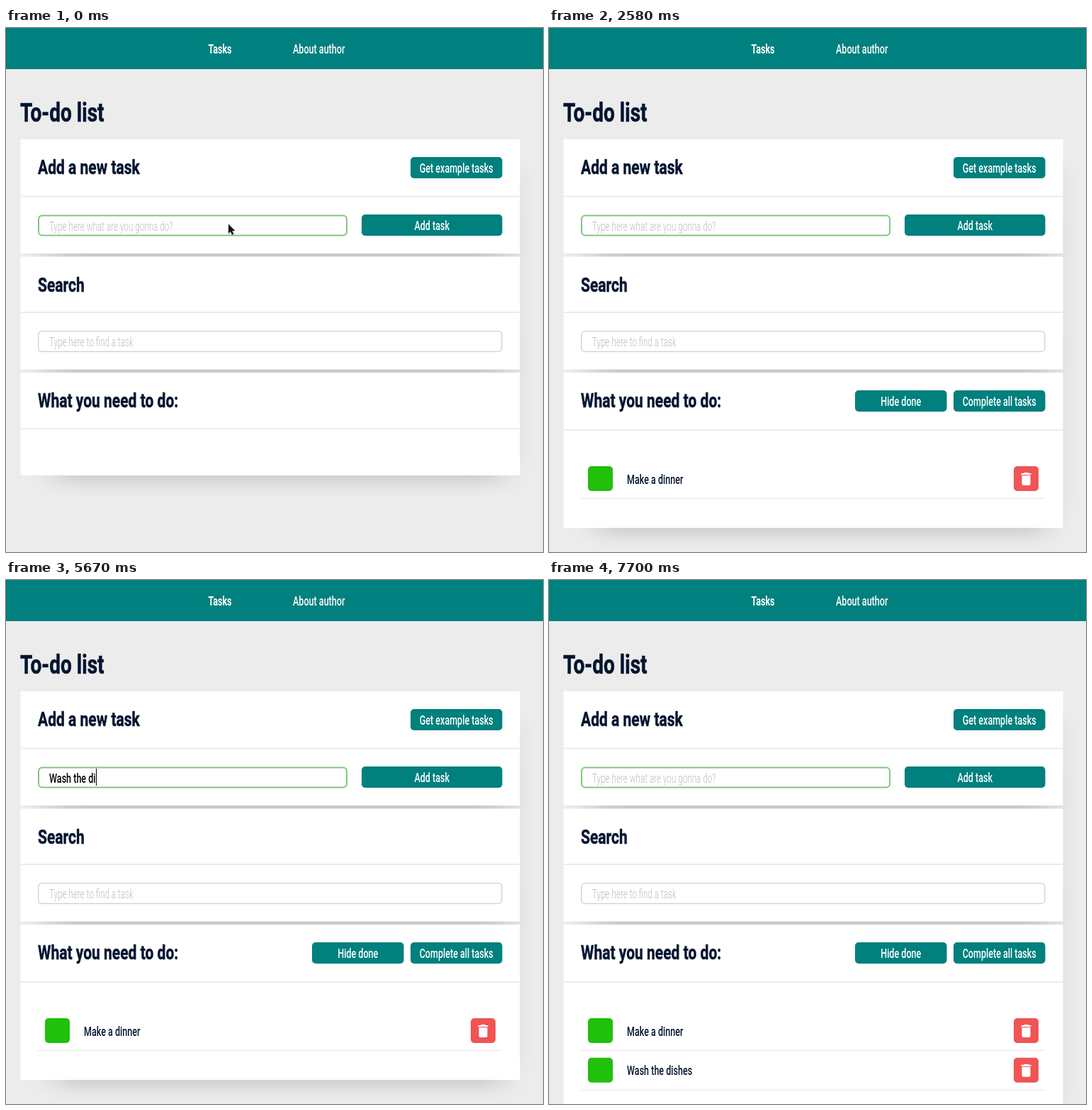
An HTML page that plays this animation: 758 by 739 pixels, repeating every 8000 ms.

```html
<!DOCTYPE html>
<html lang="en">
<head>
<meta charset="utf-8">
<title>To-do list</title>
<style>
  html, body { margin: 0; width: 100%; height: 100%; overflow: hidden; background: #ececec; }
  svg { display: block; }
  text { font-family: Roboto, "Open Sans", "Liberation Sans", sans-serif; white-space: pre; }
</style>
</head>
<body>
<svg id="stage" width="758" height="739" viewBox="0 0 758 739">
  <defs>
    <filter id="under" x="-20%" y="-100%" width="140%" height="300%"><feGaussianBlur stdDeviation="22 12"/></filter>
    <filter id="around" x="-20%" y="-20%" width="140%" height="140%"><feGaussianBlur stdDeviation="12"/></filter>
    <filter id="soft" x="-50%" y="-50%" width="200%" height="200%"><feGaussianBlur stdDeviation="1"/></filter>
  </defs>
</svg>
<script>
const LOOP = 8000;
const TEAL = '#00807e', NAVY = '#041530', LINE = '#ececec';
const ROW = 55.7;

// One condensed cut per weight: size, weight, horizontal ratio.
const FACE = {
  title: { size: 36.4, weight: 700, ratio: 0.77, stroke: 0.6 },
  heading: { size: 27.3, weight: 700, ratio: 0.77, stroke: 0.5 },
  strong: { size: 18.2, weight: 700, ratio: 0.69 },
  body: { size: 18.2, weight: 500, ratio: 0.69 },
  light: { size: 18.2, weight: 300, ratio: 0.643 }
};

const ENTRIES = [
  { text: 'Make a dinner', added: 2580,
    keys: [240, 650, 980, 1060, 1130, 1300, 1380, 1530, 1600, 1840, 1920, 2000, 2080] },
  { text: 'Wash the dishes', added: 7380,
    keys: [3570, 3730, 4300, 4540, 4700, 5020, 5190, 5270, 5350, 5500, 5670, 5830, 5990, 6070, 6230] }
];
const CARET_OFF = [[0, 240], [2580, 3080], [4230, 4300], [6730, 7220], [7700, LOOP]];
const POINTER_HIDES = 1450;

const stage = document.getElementById('stage');

function add(parent, tag, attrs) {
  const node = document.createElementNS('http://www.w3.org/2000/svg', tag);
  for (const name in attrs) node.setAttribute(name, attrs[name]);
  return parent.appendChild(node);
}

function rect(parent, x, y, width, height, fill, more = {}) {
  return add(parent, 'rect', { x, y, width, height, fill, ...more });
}

function label(parent, x, y, content, face, fill, anchor = 'start') {
  const node = add(parent, 'text', {
    transform: `translate(${x} ${y}) scale(${face.ratio} 1)`,
    'font-size': face.size, 'font-weight': face.weight, 'text-anchor': anchor, fill
  });
  if (face.stroke) {
    node.setAttribute('stroke', fill);
    node.setAttribute('stroke-width', face.stroke);
  }
  node.textContent = content;
  return node;
}

function button(parent, x, y, width, caption) {
  rect(parent, x, y, width, 30, TEAL, { rx: 5 });
  label(parent, x + width / 2, y + 22, caption, FACE.body, '#fff', 'middle');
}

function field(x, y, width, color, border) {
  rect(stage, x + border / 2, y + border / 2, width - border, 30 - border, '#fff',
    { rx: 5, stroke: color, 'stroke-width': border });
}

function section(top, bottom, divider, heading) {
  const shadow = rect(stage, 70, bottom - 50, 630, 59, '#000', { opacity: 0.15, filter: 'url(#under)' });
  const panel = rect(stage, 20.5, top, 705, bottom - top, '#fff');
  const rule = rect(stage, 20.5, divider, 705, 2, LINE);
  label(stage, 45, top + 49.3, heading, FACE.heading, NAVY);
  return { shadow, panel, rule, top };
}

function taskRow(parent, y, caption) {
  const row = add(parent, 'g', { transform: `translate(0 ${y})` });
  rect(row, 55, 0, 35, 35, '#20c00b', { rx: 5 });
  label(row, 110, 24.5, caption, FACE.body, NAVY);
  rect(row, 656, 0, 35, 35, '#f05454', { rx: 5 });
  rect(row, 666.5, 10, 14, 2, '#fff');
  rect(row, 670, 9, 7, 2, '#fff', { rx: 0.7 });
  add(row, 'path', { d: 'M667.5 13h12v12a2 2 0 0 1-2 2h-8a2 2 0 0 1-2-2z', fill: '#fff' });
  rect(row, 45, 45, 655, 1, '#e6e6e6');
  return row;
}

rect(stage, 0, 0, 758, 739, '#ececec');
rect(stage, 0, 0, 758, 58, TEAL);
label(stage, 285.5, 36, 'Tasks', FACE.strong, '#fff');
label(stage, 405, 36, 'About author', FACE.body, '#fff');
label(stage, 20, 131.5, 'To-do list', FACE.title, NAVY);

const halo = rect(stage, 40, 200, 693, 400, '#000', { opacity: 0.035, filter: 'url(#around)' });

section(157, 318, 236.5, 'Add a new task');
button(stage, 571, 182, 129.5, 'Get example tasks');
field(45, 263.5, 437, '#83c77d', 2);
button(stage, 502, 263, 198.5, 'Add task');
const hint = label(stage, 61, 286, 'Type here what are you gonna do?', FACE.light, '#bdbdbd');
const draft = label(stage, 61, 286, '', FACE.body, '#000');
const caret = rect(stage, 61, 266, 1, 24, '#000');

section(322.5, 481.5, 400, 'Search');
field(45, 427, 655.5, '#cfcfcf', 1.3);
label(stage, 61, 449.3, 'Type here to find a task', FACE.light, '#bdbdbd');

const list = section(486, 631, 564, 'What you need to do:');
const tools = add(stage, 'g', {});
button(tools, 432, 511, 129.5, 'Hide done');
button(tools, 571, 511, 129.5, 'Complete all tasks');
const rows = ENTRIES.map((entry, i) => taskRow(stage, 618 + i * ROW, entry.text));

const pointer = add(stage, 'g', {});
const arrow = 'M314 276.5v13.2l3-2.8 2.1 4.9 2.3-1-2.1-4.7h4z';
add(pointer, 'path', { d: arrow, transform: 'translate(0 1)', opacity: 0.35, filter: 'url(#soft)' });
add(pointer, 'path', { d: arrow, fill: '#111', stroke: '#fff', 'stroke-width': 1, 'paint-order': 'stroke' });

function show(node, visible) {
  node.setAttribute('visibility', visible ? 'visible' : 'hidden');
}

function render(t) {
  const done = ENTRIES.filter(entry => t >= entry.added).length;
  const current = ENTRIES[done];
  const typed = current ? current.text.slice(0, current.keys.filter(k => t >= k).length) : '';

  draft.textContent = typed;
  show(hint, !typed);
  const advance = typed ? draft.getComputedTextLength() * FACE.body.ratio : 0;
  caret.setAttribute('x', Math.round(61 + advance));
  show(caret, !CARET_OFF.some(([from, to]) => t >= from && t < to));
  show(pointer, t < POINTER_HIDES);

  const bottom = done ? 705 + (done - 1) * ROW : 631;
  list.panel.setAttribute('height', bottom - list.top);
  list.shadow.setAttribute('y', bottom - 50);
  list.rule.setAttribute('y', done ? 566 : 564);
  halo.setAttribute('height', bottom - 231);
  show(tools, done > 0);
  rows.forEach((row, i) => show(row, i < done));
}

const start = performance.now();
function tick() {
  render((performance.now() - start) % LOOP);
  requestAnimationFrame(tick);
}
tick();
</script>
</body>
</html>
```
